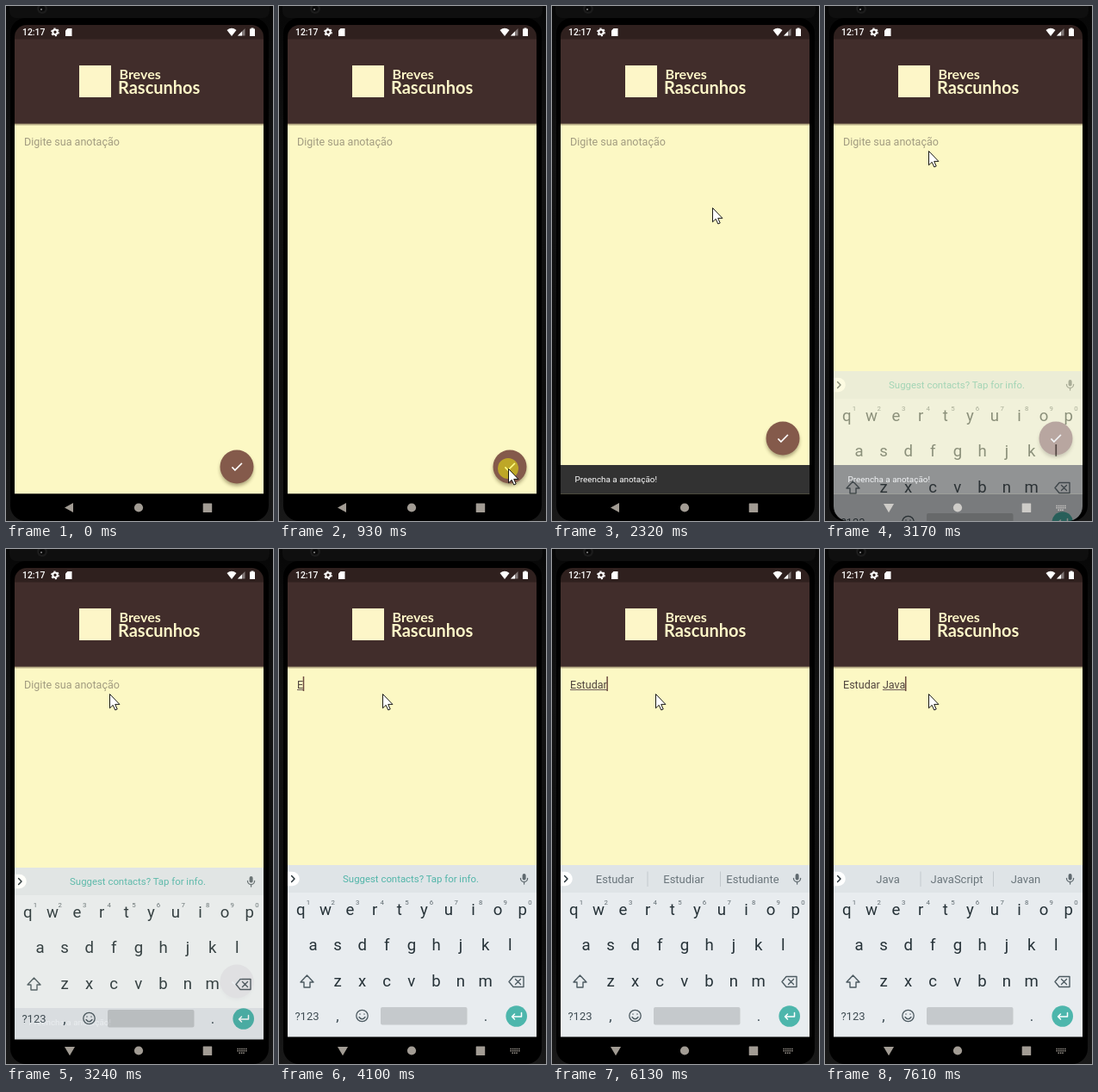
Write an HTML page that moves like this. It is 310 px wide and 598 px high and loops after 8 s.

```html
<!DOCTYPE html>
<html lang="pt-BR">
<head>
<meta charset="utf-8">
<title>Breves Rascunhos</title>
<style>
html, body { margin: 0; width: 100%; height: 100%; overflow: hidden; background: #050505; }
svg { display: block; width: 310px; height: 598px; }
text { font-family: Roboto, sans-serif; white-space: pre; }
.logo { font-family: Lato, "Open Sans", sans-serif; font-weight: 700; fill: #fdf6c8; }
.mid { text-anchor: middle; }
.line { fill: none; stroke-linecap: round; stroke-linejoin: round; }
#nav { mix-blend-mode: screen; }
</style>
</head>
<body>
<svg viewBox="0 0 310 598">
  <defs>
    <clipPath id="screen"><path d="M10 36A14 14 0 0 1 24 22H285A14 14 0 0 1 299 36V581A17 17 0 0 1 282 598H27A17 17 0 0 1 10 581Z"/></clipPath>
    <clipPath id="aboveNav"><rect x="10" y="137" width="289" height="429.500"/></clipPath>
    <linearGradient id="drop" x2="0" y2="1">
      <stop offset="0" stop-color="#5d4a35" stop-opacity=".75"/>
      <stop offset="1" stop-color="#5d4a35" stop-opacity="0"/>
    </linearGradient>
    <linearGradient id="side" x2="0" y2="1">
      <stop offset="0" stop-color="#070707"/>
      <stop offset=".3" stop-color="#131313"/>
      <stop offset=".75" stop-color="#0d0d0d"/>
      <stop offset="1" stop-color="#191919"/>
    </linearGradient>
    <filter id="soft" x="-50%" y="-50%" width="200%" height="200%"><feGaussianBlur stdDeviation="2"/></filter>
  </defs>

  <!-- device body -->
  <rect width="310" height="598" fill="url(#side)"/>
  <rect x="4" y="-10" width="302" height="24" rx="8" fill="#0f0f0f"/>
  <rect x="5" y="14" width="300" height="584" rx="18" fill="#000"/>
  <circle cx="42" cy="3" r="6" fill="#1c1c1c"/>
  <circle cx="42" cy="3" r="3.5" fill="#090909"/>
  <circle cx="41" cy="4" r="1" fill="#8a8a8a"/>

  <g clip-path="url(#screen)">
    <rect x="10" y="22" width="289" height="545" fill="#fcf8c4"/>
    <rect x="10" y="136" width="289" height="3.500" fill="url(#drop)"/>
    <rect x="10" y="22" width="289" height="114.500" fill="#412d2b"/>
    <rect x="10" y="22" width="289" height="16.500" fill="#2f201e"/>

    <!-- status bar -->
    <g fill="#fff">
      <text x="19" y="33.800" font-size="10.400" font-weight="500">12:17</text>
      <circle cx="57" cy="30.300" r="2.700" fill="none" stroke="#fff" stroke-width="2"/>
      <circle cx="57" cy="30.300" r="4.200" fill="none" stroke="#fff" stroke-width="1.400" stroke-dasharray="2.200 2.200"/>
      <path d="M71.500 26H76.500V35H69V28.500Z"/>
      <path d="M256.500 28Q262 23.500 267.500 28L262 35Z"/>
      <path d="M277.500 26V34.500H269Z" opacity=".4"/>
      <path d="M274 29.500V34.500H269Z"/>
      <path d="M283 26.500H284.500V25.500H287.500V26.500H289V35H283Z"/>
    </g>

    <!-- header -->
    <rect x="85" y="69" width="37" height="37" fill="#fdf6c8"/>
    <text class="logo" x="131.500" y="85" font-size="16">Breves</text>
    <text class="logo" x="130" y="102" font-size="20">Rascunhos</text>

    <!-- note -->
    <text id="hint" x="21" y="161.500" font-size="12.550" fill="#a29c80">Digite sua anotação</text>
    <text id="note" x="21" y="161.500" font-size="12.550" fill="#50443e"></text>
    <rect id="under" y="163" height="1" fill="#6b5a58"/>
    <rect id="caret" y="148" width="1.500" height="17" fill="#6d4c41"/>

    <g clip-path="url(#aboveNav)">
      <g id="fab">
        <circle cx="268" cy="3" r="19" fill="#3b2a10" opacity=".45" filter="url(#soft)"/>
        <circle id="disc" cx="268" r="19.500"/>
        <path d="M265.900 2.900L263 0L262 1L265.900 4.900L274.300 -3.500L273.300 -4.500Z" fill="#fff" stroke="#fff" stroke-width=".3"/>
      </g>
      <g id="snack">
        <rect x="10" y="533" width="289" height="34" fill="#323232"/>
        <text id="snackText" x="26.500" y="553.200" font-size="9.900" fill="#fff">Preencha a anotação!</text>
      </g>
    </g>
    <rect x="10" y="566.500" width="289" height="32" fill="#000"/>

    <!-- keyboard -->
    <g id="board">
      <rect x="10" y="367" width="289" height="200" fill="#e8ecef"/>
      <rect x="10" y="367" width="289" height="32" fill="#dfe4e7"/>
      <rect x="10" y="566.500" width="289" height="32" fill="#000"/>
      <path d="M10 374.700H15.500A8.300 8.300 0 0 1 15.500 391.300H10Z" fill="#fff"/>
      <path class="line" d="M14.600 379.500L18 383L14.600 386.500" stroke="#263238" stroke-width="1.500"/>
      <rect x="282.600" y="377" width="4" height="7.500" rx="2" fill="#5f696f"/>
      <path class="line" d="M280.500 382.500A4 4 0 0 0 288.600 382.500M284.600 386.700V389" stroke="#5f696f" stroke-width="1.300"/>
      <text id="tip" class="mid" x="153" y="387.300" font-size="11.400" fill="#52b5a9">Suggest contacts? Tap for info.</text>
      <g id="words">
        <path d="M111 374.500V392M195.500 374.500V392" stroke="#c3c9cd"/>
      </g>
      <g id="keys"></g>
      <path class="line" d="M32.500 495L40 503H36V509H29V503H25Z" stroke="#4c5a61" stroke-width="1.400"/>
      <path class="line" d="M272 496.500H284V508.500H272L267 502.500ZM274.500 499.500L280.500 505.500M280.500 499.500L274.500 505.500" stroke="#4c5a61" stroke-width="1.400"/>
      <text class="mid" x="32.500" y="547" font-size="13" fill="#3f4c53">?123</text>
      <text class="mid" x="68" y="548" font-size="17" fill="#37474f">,</text>
      <text class="mid" x="240" y="548" font-size="17" fill="#37474f">.</text>
      <g class="line" stroke="#4c5a61" stroke-width="1.300">
        <circle cx="96.500" cy="542" r="6.700"/>
        <path d="M93 543.500Q96.500 548 100 543.500M94 540V540.200M99 540V540.200"/>
      </g>
      <rect x="118" y="532" width="100.500" height="20.500" rx="2" fill="#c5c9cc"/>
      <circle cx="275.700" cy="542.500" r="12.300" fill="#4db6ac"/>
      <path class="line" d="M281.500 538.500V543H270.500M273.500 540L270.500 543L273.500 546" stroke="#fff" stroke-width="1.500"/>
    </g>

    <!-- navigation -->
    <g id="nav" fill="#a29c94">
      <path id="back" d="M68 582.500L78 577V588Z"/>
      <path id="down" d="M68 578H80L74 588.300Z"/>
      <circle cx="154" cy="582.500" r="5.100"/>
      <rect x="228.700" y="577.500" width="10.500" height="10.500" rx=".5"/>
      <path id="keyIcon" d="M268.500 580.500H279.500M268.500 582.800H279.500M270.500 585.200H277.500" stroke="#a29c94" stroke-width="1.400" stroke-dasharray="1.400 1"/>
    </g>
  </g>

  <g id="mouse">
    <circle id="press" r="12" fill="#ff0" opacity=".47"/>
    <path d="M.5 .5V16.800L4.200 13.300L6.800 19L9.200 18L6.700 12.400H11.900Z" fill="#fff" stroke="#000" stroke-width=".9"/>
  </g>
</svg>
<script>
const LOOP = 8000;
const ui = {};
for (const node of document.querySelectorAll("svg [id]")) ui[node.id] = node;

function addText(parent, x, y, size, fill, str) {
  const node = document.createElementNS("http://www.w3.org/2000/svg", "text");
  const attrs = { x, y, fill, "font-size": size, class: "mid" };
  for (const k in attrs) node.setAttribute(k, attrs[k]);
  node.textContent = str;
  parent.append(node);
  return node;
}

const KEY_GAP = 28.6, ROW_GAP = 41.3;
[["qwertyuiop", 25.3], ["asdfghjkl", 39.5], ["zxcvbnm", 68]].forEach(([row, x0], r) => {
  [...row].forEach((ch, i) => {
    const x = x0 + i * KEY_GAP;
    addText(ui.keys, x, 425 + r * ROW_GAP, 18.6, "#263238", ch);
    if (r === 0) addText(ui.keys, x + 8.7, 413.3, 7.8, "#5f6a70", (i + 1) % 10);
  });
});
const slots = [73, 153, 233].map(x => addText(ui.words, x, 388, 13, "#6a757b", ""));

// Each row: start time, then the values held until the next row.
const POINTER = [
  [0, -50, 700], [380, 232, 592], [460, 248, 570], [540, 260, 553], [620, 268, 544], [690, 267, 539], [770, 266, 537],
  [1940, 264, 528], [2010, 257, 497], [2090, 240, 430], [2170, 219, 350], [2240, 201, 284], [2320, 186, 234],
  [2410, 158, 204], [2480, 132, 178], [2550, 120, 168]
];
// drop distance, label opacity
const SNACK = [[0, 33, 0], [1080, 26, 0], [1160, 13, .25], [1240, 5, .5], [1310, 2, .75], [1390, 0, 1]];
const DISC = [[0, "#845a4b"], [1010, "#744e41"], [1080, "#68463b"], [1160, "#5f4037"], [1390, "#6f4b3f"], [1460, "#845a4b"]];
// drop distance, opacity
const BOARD = [[0, 240, 0], [3090, 120, .15], [3170, 57, .52], [3240, 3, .92], [3330, .5, .98], [3410, 0, 1]];
// text, start of the underlined word
const TYPING = [
  [0, "", 0], [4100, "E", 0], [4170, "Es", 0], [5030, "Est", 0], [5200, "Estu", 0], [5970, "Estud", 0],
  [6050, "Estuda", 0], [6130, "Estudar", 0], [6590, "Estudar ", 8], [7140, "Estudar J", 8],
  [7220, "Estudar Ja", 8], [7290, "Estudar Jav", 8], [7610, "Estudar Java", 8]
];
const WORDS = [
  [0, ""], [5030, "Est East Eat"], [5200, "Estu Estuary Estuaries"], [5970, "Estud Estudio Estudiante"],
  [6130, "Estudar Estudiar Estudiante"], [6590, "is in and"], [7140, "J Just Jan"], [7610, "Java JavaScript Javan"]
];
const CARET = [[430, 930], [1460, 1940], [2480, 3090], [3410, 3930], [4100, 4720], [5030, 5650], [5970, LOOP]];
const PRESS = [[930, 1010], [2780, 2860]];

const held = (rows, t) => rows.filter(r => r[0] <= t).pop().slice(1);
const within = (spans, t) => spans.some(([a, b]) => t >= a && t < b);
const show = (node, on) => node.setAttribute("visibility", on ? "visible" : "hidden");
const move = (node, x, y) => node.setAttribute("transform", `translate(${x} ${y})`);

function drawNote(t) {
  const [str, start] = held(TYPING, t);
  const note = ui.note;
  if (note.textContent !== str) note.textContent = str;
  const end = str ? note.getComputedTextLength() : 0;
  const from = start && start < str.length ? note.getSubStringLength(0, start) : 0;
  show(ui.hint, !str);
  show(ui.under, start < str.length);
  ui.under.setAttribute("x", 21 + from);
  ui.under.setAttribute("width", Math.max(0, end - from));
  ui.caret.setAttribute("x", 20.6 + end);
  show(ui.caret, within(CARET, t));
}

function draw(t) {
  drawNote(t);

  const [drop, label] = held(SNACK, t);
  move(ui.snack, 0, drop);
  ui.snackText.setAttribute("opacity", label);
  move(ui.fab, 0, 502 + drop);
  ui.disc.setAttribute("fill", held(DISC, t)[0]);

  const [slide, alpha] = held(BOARD, t);
  move(ui.board, 0, slide);
  ui.board.setAttribute("opacity", alpha);
  const open = alpha > 0;
  show(ui.back, !open);
  show(ui.down, open);
  show(ui.keyIcon, open);

  const words = held(WORDS, t)[0];
  show(ui.tip, !words);
  show(ui.words, words);
  const parts = words.split(" ");
  slots.forEach((s, i) => s.textContent = parts[i] || "");

  move(ui.mouse, ...held(POINTER, t));
  show(ui.press, within(PRESS, t));
}

function tick() {
  draw(performance.now() % LOOP);
  requestAnimationFrame(tick);
}
tick();
</script>
</body>
</html>
```
